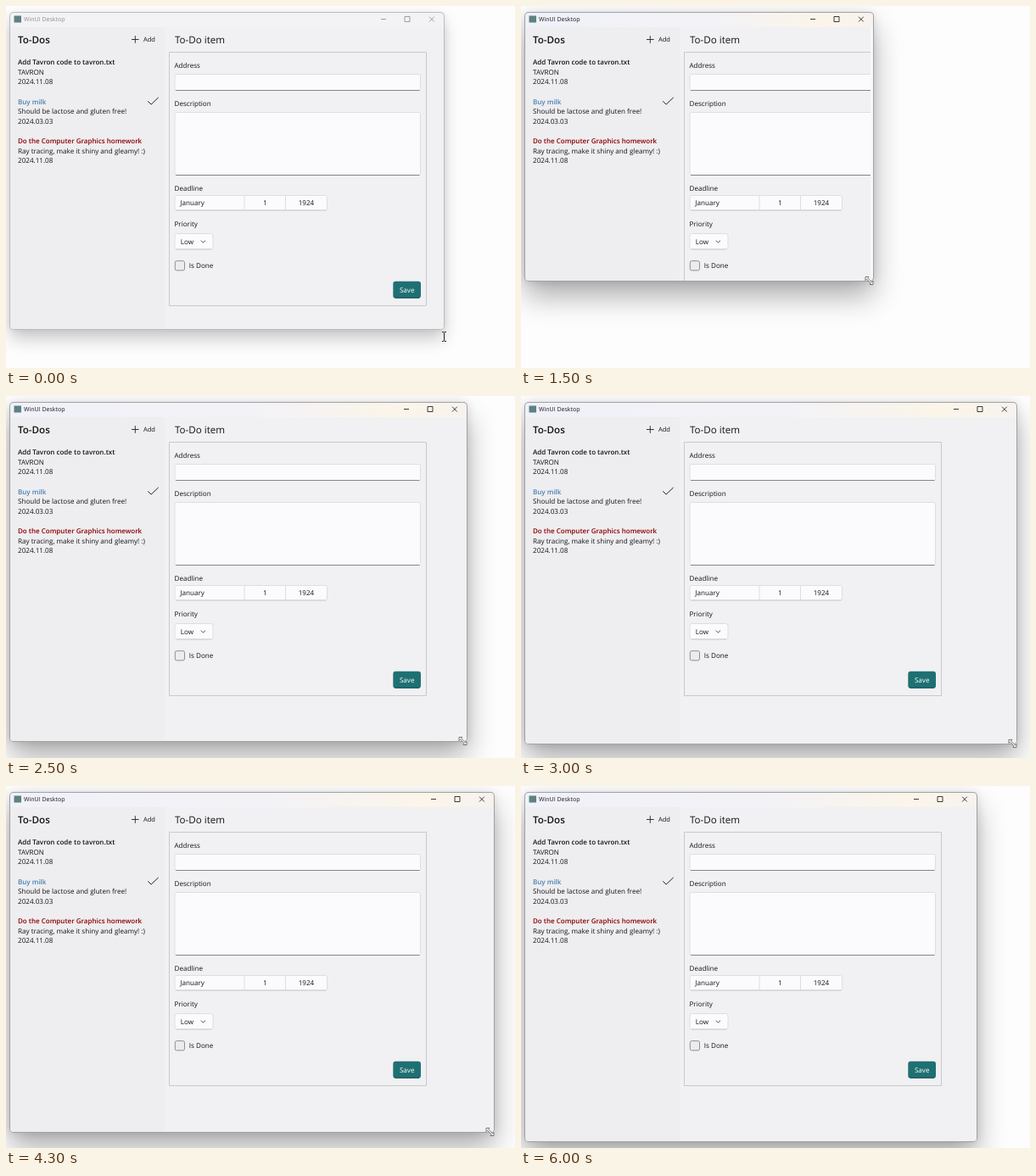
Write an HTML page that moves like this. It is 600x427 px and loops after 6900 ms.

```html
<!DOCTYPE html>
<html lang="en">
<meta charset="utf-8">
<title>To-Do window</title>
<style>
  html, body { margin: 0; width: 100%; height: 100%; overflow: hidden; background: #fdfdfd; }
  svg { display: block; }
  #stage { position: relative; width: 600px; height: 427px; overflow: hidden; }
  #win {
    position: absolute; left: 5px; top: 8px; overflow: hidden; border-radius: 4px;
    background: #f3f2f4;
    box-shadow: 0 0 0 1px #bcbcbe, 0 12px 20px rgba(0,0,0,.2), 0 1px 10px rgba(0,0,0,.1);
    --ink: #8f8f92;
  }
  #win.active {
    background: linear-gradient(90deg, #f0f1f9, #f3f2f6 55%, #fbf5e9 85%, #f7f2ee) 0 0 / 100% 17px no-repeat, #f8f8fa;
    box-shadow: 0 0 0 1px #a2a2a4, 0 18px 34px rgba(0,0,0,.32), 0 1px 12px rgba(0,0,0,.14);
    --ink: #1a1a1a;
  }
  #ui { position: absolute; left: -5px; top: -8px; }
  #pointer { position: absolute; left: 0; top: 0; }
  text { font: 8.1px "Open Sans", "Noto Sans", sans-serif; fill: #151515; text-rendering: geometricPrecision; }
  .semi { font-size: 8px; font-weight: 600; }
  .head { font-size: 11.6px; }
  .mid { text-anchor: middle; }
  .line { fill: none; stroke: #222; }
  .box { fill: #fbfafc; stroke: #dedee0; }
  .under { stroke: #858587; }
  .soft { stroke: #cbcbcd; }
  .caption { stroke: var(--ink); fill: none; stroke-width: .85; }
</style>
<div id="stage">
  <div id="win">
    <svg id="ui" width="600" height="427">
      <rect x="9.5" y="11.5" width="8.5" height="8" fill="#5f8183"/>
      <text x="21" y="18.1" style="font-size:7px;fill:var(--ink)">WinUI Desktop</text>
      <path id="buttons" class="caption" d="M-74 15.5h6M-46 12.5h6v6h-6zM-17 12.7l5.8 5.8m0-5.8l-5.8 5.8"/>

      <rect id="body" x="187" y="25" fill="#f1f0f3"/>
      <rect id="side" x="4" y="25" width="183" fill="#eeedf0"/>
      <text class="head" x="14" y="44.3" style="font-weight:600">To-Dos</text>
      <path class="line" d="M148 39.5h8.6M152.3 35.2v8.6" stroke-width=".9"/>
      <text x="162" y="42.3" style="font-size:7.5px">Add</text>
      <g id="todos"></g>
      <path class="line" d="M167.3 112.3l3.8 3.8 8.6-8.2"/>

      <svg id="view">
        <text class="head" x="199" y="44.3">To-Do item</text>
        <path class="line" d="M192.5 54.5h303v299h-303z" style="stroke:#c9c8cb"/>
        <g id="labels"></g>
        <rect class="box" x="199" y="80.5" width="289.5" height="19" rx="2"/>
        <rect class="box" x="199" y="125.5" width="289.5" height="74" rx="2"/>
        <path class="under" d="M200 99.5h287.5M200 199.5h287.5"/>
        <rect class="box" x="199" y="223.5" width="179.5" height="17.5" rx="2"/>
        <path d="M281 223.5v17M329.5 223.5v17" stroke="#dedee0"/>
        <text x="205.3" y="235">January</text>
        <text class="mid" x="305.4" y="235">1</text>
        <text class="mid" x="354" y="235">1924</text>
        <rect class="box" x="199" y="268.5" width="45" height="18.5" rx="2.5"/>
        <path class="soft" d="M200 241h177.5M201 287h41"/>
        <text x="205.8" y="280.6">Low</text>
        <path class="line" d="M229.8 276.6l2.6 2.6 2.6-2.6" stroke-width=".8"/>
        <rect x="199.3" y="300.7" width="11.2" height="11.2" rx="2" fill="#ecebee" stroke="#858587" stroke-width=".9"/>
        <text x="215.8" y="309">Is Done</text>
        <rect x="456.3" y="324.7" width="32.7" height="20" rx="3" fill="#1f7073"/>
        <path d="M458.5 344.2h28.5" stroke="#155154"/>
        <text class="mid" x="472.7" y="337.6" style="fill:#fff">Save</text>
      </svg>
      <rect id="thumb" y="64" width="1.6" rx=".8" fill="#89898b"/>
    </svg>
  </div>
  <svg id="pointer" width="600" height="427">
    <path id="beam" class="line" d="M-2.5-5.5h1.8l.7.7.7-.7h1.8M0-4.8v9.6M-2.5 5.5h1.8l.7-.7.7.7h1.8"/>
    <path id="grip" d="M-5-5h4l-1.4 1.4 5 5 1.4-1.4v4h-4l1.4-1.4-5-5-1.4 1.4z"
      fill="#fff" stroke="#444" stroke-width=".7"/>
  </svg>
</div>
<script>
const LOOP = 6900, STEP = 100;
const $ = id => document.getElementById(id);

const todos = [
  ["#151515", "Add Tavron code to tavron.txt", "TAVRON", "2024.11.08"],
  ["#4682b4", "Buy milk", "Should be lactose and gluten free!", "2024.03.03"],
  ["#8b0000", "Do the Computer Graphics homework", "Ray tracing, make it shiny and gleamy! :)", "2024.11.08"]
];
$("todos").innerHTML = todos.map(([color, title, ...notes], i) => {
  const y = 69 + 46.6 * i;
  return `<text class="semi" x="14" y="${y}" style="fill:${color}">${title}</text>` +
    notes.map((s, j) => `<text x="14" y="${y + 11.5 * (j + 1)}">${s}</text>`).join("");
}).join("");

const labels = { Address: 73.2, Description: 118, Deadline: 218.2, Priority: 260.1 };
$("labels").innerHTML = Object.entries(labels)
  .map(([s, y]) => `<text x="198.5" y="${y}">${s}</text>`).join("");

// Turning points of the dragged corner: time, right, bottom
const corner = [
  [900, 516, 381], [1500, 415, 324], [1900, 370, 303], [2300, 524, 396], [2500, 543, 407],
  [3100, 586, 410], [3500, 553, 395], [4300, 575, 408], [5300, 550, 413], [5500, 550, 413], [6000, 537, 419]
];

// Smooth curve through the points that never overshoots them
function follow(t, c) {
  const last = corner.length - 1;
  if (t <= corner[0][0]) return corner[0][c];
  if (t >= corner[last][0]) return corner[last][c];
  const chord = i => i < 0 || i >= last ? 0 :
    (corner[i + 1][c] - corner[i][c]) / (corner[i + 1][0] - corner[i][0]);
  const slope = i => {
    const a = chord(i - 1), b = chord(i);
    return a * b > 0 ? 2 * a * b / (a + b) : 0;
  };
  const i = corner.findIndex(k => k[0] > t) - 1;
  const [p, q] = [corner[i], corner[i + 1]];
  const d = q[0] - p[0], u = (t - p[0]) / d, v = 1 - u;
  return p[c] * v * v * (1 + 2 * u) + q[c] * u * u * (1 + 2 * v) +
    d * u * v * (v * slope(i) - u * slope(i + 1));
}

function set(id, attrs) {
  for (const name in attrs) $(id).setAttribute(name, attrs[name]);
}

function draw(time) {
  const t = Math.floor(time % LOOP / STEP) * STEP;
  const right = follow(t, 1), bottom = follow(t, 2);
  const active = t >= 1000;
  const shrinking = t < 5500 && right < follow(t - STEP, 1);
  const narrow = right < 385;
  const edge = right - (shrinking ? 3 : 0);
  const floor = bottom - (narrow ? 6 : 0);

  $("win").className = active ? "active" : "";
  $("win").style.width = right - 5 + "px";
  $("win").style.height = bottom - 8 + "px";
  set("buttons", { transform: `translate(${right})` });
  set("body", { width: edge - 187, height: floor - 25 });
  set("side", { height: floor - 25 });
  set("view", { width: narrow ? right - 8 : edge, height: floor });
  set("thumb", { x: right - 7, height: bottom - 127, opacity: narrow ? 1 : 0 });

  const rise = Math.min(t / 500, 1);
  const at = active ? `translate(${right - 4} ${bottom + .5})` : `translate(${516.5 - rise} ${390 - 5 * rise})`;
  set("beam", { transform: at, opacity: t < 800 ? 1 : 0 });
  set("grip", {
    transform: active ? at : "translate(515 380.5)",
    opacity: t >= 800 && t < 6000 ? 1 : 0
  });
}

function tick() {
  draw(performance.now());
  requestAnimationFrame(tick);
}
tick();
</script>
</html>
```
